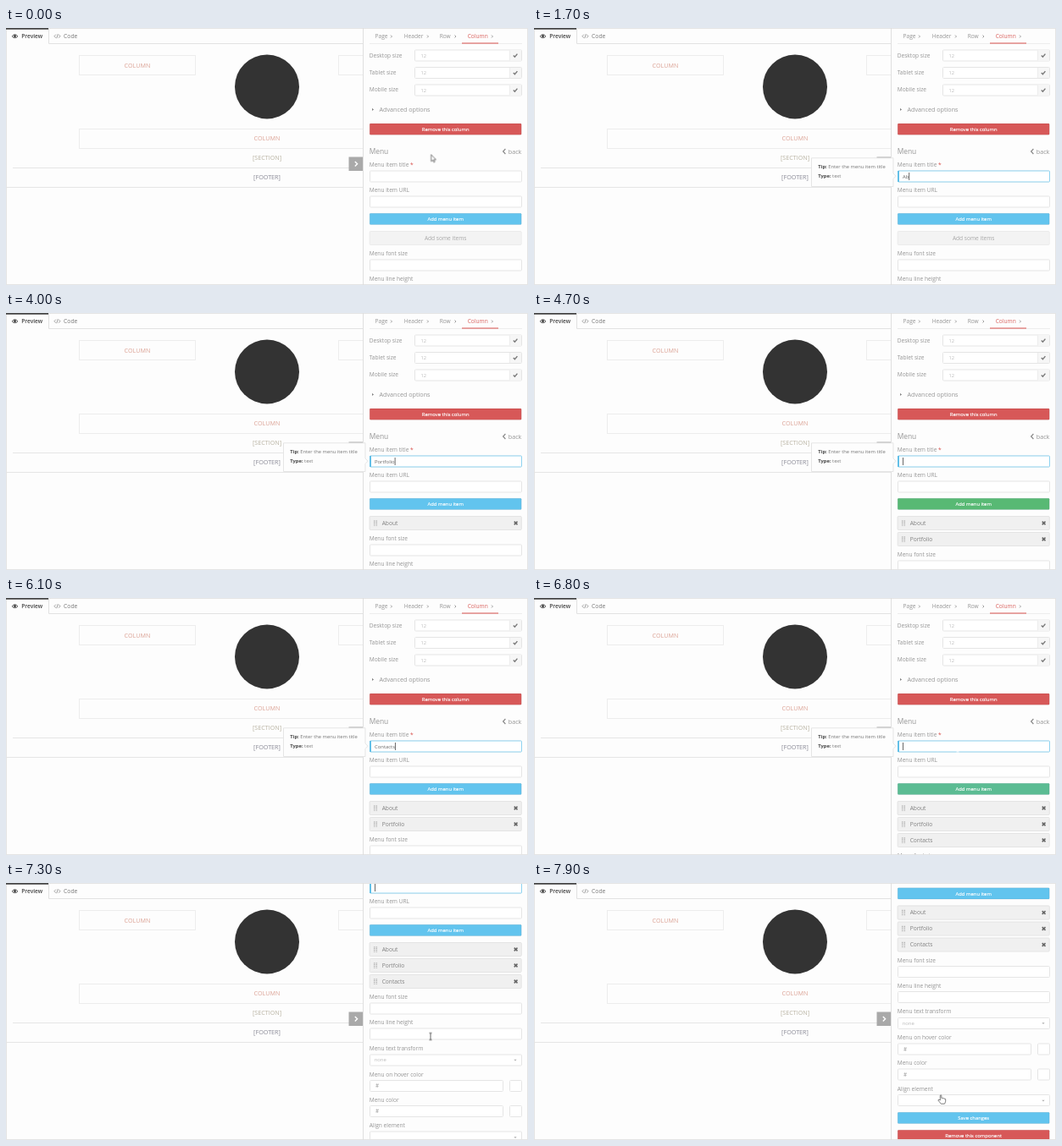
Recreate the animation shown at these times as an HTML page. Size 616x304 px, loop 8000 ms.

```html
<!DOCTYPE html>
<html lang="en">
<head>
<meta charset="utf-8">
<title>Menu editor</title>
<style>
  html, body { margin: 0; width: 100%; height: 100%; overflow: hidden; background: #fdfdfd; }
  svg { display: block; width: 616px; height: 304px; }
  text { font: 6.6px "Open Sans", "Noto Sans", sans-serif; fill: #959595; white-space: pre; }
  .mid { text-anchor: middle; }
  .big { font-size: 7.2px; }
  .btn { font-size: 5.9px; fill: #fff; stroke: #fff; stroke-width: .15; text-anchor: middle; }
  .val { font-size: 5.9px; fill: #666; }
  .hint { font-size: 5.7px; fill: #bbb; }
  .tip { font-size: 5.8px; fill: #777; }
  .tip tspan { font-weight: 700; fill: #444; }
  .item { font-size: 6.6px; fill: #808080; }
  .box { fill: #fff; stroke: #e5e5e5; }
  .line { fill: none; stroke: #ededed; }
  .ico { fill: none; stroke: #8a8a8a; }
  .blue { fill: #62c4ee; stroke: rgba(0, 60, 90, .16); stroke-width: .6; }
  .red { fill: #d75858; stroke: rgba(90, 0, 0, .16); stroke-width: .6; }

  .anim { animation: 8s step-end -20ms infinite; }
  #scroll { animation-name: scroll; }
  #tip { animation-name: tip; }
  #focus { animation-name: focus; }
  #arrow { animation-name: arrow; }
  #beam { animation-name: beam; }
  #hand { animation-name: hand; }
  #add { animation-name: add; }
  .flush { animation-name: flush; }

  @keyframes scroll {
    0% { transform: translateY(0); }
    86.25% { transform: translateY(-6px); }
    87.5% { transform: translateY(-22px); }
    88.75% { transform: translateY(-46.5px); }
    90% { transform: translateY(-104px); }
    91.25% { transform: translateY(-170px); }
    92.5%, 100% { transform: translateY(-213.5px); }
  }
  @keyframes tip {
    0% { opacity: 0; }
    10% { opacity: .35; }
    11.25% { opacity: .7; }
    12.5% { opacity: 1; }
    90% { opacity: .5; }
    91.25%, 100% { opacity: 0; }
  }
  @keyframes focus { 0% { opacity: 0; } 10%, 100% { opacity: 1; } }
  @keyframes arrow {
    0% { transform: translate(501.5px, 149.5px); opacity: 1; }
    6.25% { transform: translate(502px, 155px); opacity: 1; }
    7.5% { transform: translate(502px, 163px); opacity: 1; }
    8.75%, 100% { opacity: 0; }
  }
  @keyframes beam {
    0% { opacity: 0; }
    8.75% { transform: translate(502px, 175.5px); stroke: #555; opacity: 1; }
    13.75% { opacity: 0; }
    85% { transform: translate(500px, 178px); stroke: #fff; opacity: 1; }
    90% { transform: translate(501px, 181.5px); stroke: #555; opacity: 1; }
    95%, 100% { opacity: 0; }
  }
  @keyframes hand {
    0% { opacity: 0; }
    97.5% { transform: translate(478px, 240px); opacity: 1; }
    98.75%, 100% { transform: translate(476px, 250px); opacity: 1; }
  }
  /* flashes green on every added item, then fades back */
  @keyframes add {
    0% { fill: #62c4ee; }
    26.25% { fill: #62c4ee; animation-timing-function: steps(3); }
    30% { fill: #58b974; }
    31.25% { fill: #58b974; animation-timing-function: steps(4); }
    36.25% { fill: #62c4ee; }
    55% { fill: #62c4ee; animation-timing-function: steps(3); }
    58.75% { fill: #58b974; }
    60% { fill: #58b974; animation-timing-function: steps(5); }
    66.25% { fill: #62c4ee; }
    77.5% { fill: #62c4ee; animation-timing-function: steps(3); }
    81.25% { fill: #58b974; }
    83.75% { fill: #58b974; animation-timing-function: steps(4); }
    88.75%, 100% { fill: #62c4ee; }
  }
  @keyframes flush {
    0% { stroke: #666; }
    86.25% { stroke: #c24a4a; }
    90%, 100% { stroke: #666; }
  }
</style>
</head>
<body>
<svg viewBox="0 0 616 304">
  <defs>
    <clipPath id="view"><rect x="1" y="19" width="420" height="284"/></clipPath>
    <clipPath id="side"><rect x="421" y="1" width="194" height="302"/></clipPath>
    <path id="next" class="ico" d="M0-1.5 1.5 0 0 1.5" stroke-width=".8"/>
    <path id="drop" d="M-1.6-.8h3.2L0 1z" fill="#aaa"/>
    <g id="size">
      <rect class="box" x="482.5" y="-6.5" width="126" height="13" rx="1"/>
      <path d="M594.5-6h13.5v12h-13.5z" fill="#f6f6f6"/>
      <path class="line" d="M594.5-6v12"/>
      <path class="ico" d="M598.8 0l1.6 1.7 3-3.6" stroke-width="1.4" style="stroke:#777"/>
      <text class="hint" x="489.5" y="2">12</text>
    </g>
    <rect id="field" class="box" x="429.5" y=".5" width="179" height="13" rx="1"/>
    <rect id="button" x="429.2" y=".3" width="179" height="13.2" rx="1"/>
    <g id="color">
      <rect class="box" x="429.5" y=".5" width="157" height="13" rx="1"/>
      <rect class="box" x="594.5" y=".5" width="14" height="13" rx="1"/>
      <text class="hint" x="436" y="9.4" style="font-size:6.4px;fill:#999">#</text>
    </g>
    <g id="bar">
      <rect x="429.2" y=".5" width="179" height="16" rx="1" fill="#f0f0f0" stroke="#e4e4e4"/>
      <path d="M434.7 5.3v6.8M437.3 5.3v6.8" stroke="#b5b5b5" stroke-width="1.5" stroke-dasharray="1.1 .7"/>
      <path class="anim flush" d="M599.7 6.6l3.8 3.8m0-3.8l-3.8 3.8" stroke-width="1.5"/>
    </g>
  </defs>

  <rect width="616" height="304" fill="#fdfdfd"/>

  <!-- preview -->
  <g clip-path="url(#view)">
    <g class="line">
      <rect x="86.5" y="32.5" width="137" height="23"/>
      <rect x="392.5" y="32.5" width="137" height="23"/>
      <rect x="86.5" y="119.5" width="443" height="23"/>
      <path d="M8 165.5h413M1 188.5h420" stroke="#e6e6e6"/>
    </g>
    <circle cx="308" cy="69.5" r="38" fill="#333"/>
    <text class="big mid" x="155" y="46.6" style="fill:#dca396">COLUMN</text>
    <text class="big mid" x="308" y="133.4" style="fill:#dca396">COLUMN</text>
    <text class="big mid" x="308" y="156.3" style="fill:#b8b2a2">[SECTION]</text>
    <text class="big mid" x="308" y="179.3" style="fill:#8a8a96">[FOOTER]</text>
  </g>

  <!-- tabs -->
  <path d="M50.5 1v17.5H421" fill="none" stroke="#e2e2e2"/>
  <path d="M.5 0v304M0 303.5h616M615.5 0v304M50 .5h566" fill="none" stroke="#e4e4e4"/>
  <path d="M0 0h50v1.7H0z" fill="#444"/>
  <path d="M7 9.8Q10.5 5.6 14 9.8 10.5 13.6 7 9.8z" fill="none" stroke="#444" stroke-width=".9"/>
  <circle cx="10.5" cy="9.6" r="1.5" fill="#444"/>
  <text x="18.3" y="12" style="font-weight:600;fill:#444">Preview</text>
  <path class="ico" d="M58.8 7.7l-1.8 2 1.8 2m3.4-4l1.8 2-1.8 2M61.2 7.2l-1.4 5" stroke-width=".8"/>
  <text x="68" y="12" style="font-size:6.8px;fill:#777">Code</text>

  <rect x="404.5" y="152.5" width="17" height="16.5" fill="#a9a9a9"/>
  <path d="M411.8 158l2.8 2.8-2.8 2.8" fill="none" stroke="#fff" stroke-width="1.4"/>

  <!-- side panel -->
  <path d="M421.5 0v304" stroke="#dfdfdf"/>
  <g clip-path="url(#side)">
    <g id="scroll" class="anim">
      <path class="line" d="M429 18.5h180"/>
      <path d="M538 18h43" stroke="#d9534f"/>
      <text x="435.6" y="12.3">Page</text><use href="#next" x="454" y="10"/>
      <text x="469.7" y="12.3">Header</text><use href="#next" x="497" y="10"/>
      <text x="511.7" y="12.3">Row</text><use href="#next" x="529.5" y="10"/>
      <text x="544.7" y="12.3" style="fill:#d9605c">Column</text><use href="#next" x="573" y="10"/>

      <text x="428.7" y="34.7">Desktop size</text><use href="#size" y="32.5"/>
      <text x="428.7" y="55.1">Tablet size</text><use href="#size" y="53"/>
      <text x="428.7" y="75.4">Mobile size</text><use href="#size" y="73.5"/>

      <path class="anim flush" d="M432.5 95.4v2l1-1z" fill="#777" stroke-width=".6"/>
      <text class="big" x="440.5" y="99.1">Advanced options</text>
      <use href="#button" class="red" y="112.8"/>
      <text class="btn" x="518.7" y="121.8">Remove this column</text>

      <text x="428.7" y="149.2" style="font-size:8.4px">Menu</text>
      <path class="ico" d="M589.4 143l-2.8 3 2.8 3" stroke-width="1.2"/>
      <text class="big" x="592.8" y="148.7">back</text>

      <text x="428.7" y="164.3">Menu item title <tspan fill="#d9534f">*</tspan></text>
      <use href="#field" y="168.5"/>
      <g id="focus" class="anim">
        <rect x="429.5" y="169" width="179" height="13" rx="1" fill="#fff" stroke="#8fd3f0"/>
        <path d="M430 169v13" stroke="#62bfe7" stroke-width="2"/>
        <rect id="caret" x="435" y="171" width=".8" height="9" fill="#444"/>
      </g>
      <text id="typed" class="val" x="435" y="177.7"></text>

      <text x="428.7" y="194.3">Menu item URL</text>
      <use href="#field" y="198.5"/>
      <use href="#button" id="add" class="blue anim" y="219"/>
      <text class="btn" x="518.7" y="228.2">Add menu item</text>

      <rect x="429.2" y="240.5" width="179" height="16" rx="1" fill="#f3f3f3" stroke="#ebebeb"/>
      <text class="mid" x="518.7" y="250.8" style="fill:#a8a8a8">Add some items</text>
      <g class="entry"><use href="#bar" y="240"/><text class="item" x="443.7" y="250.5">About</text></g>
      <g class="entry"><use href="#bar" y="259"/><text class="item" x="443.7" y="269.5">Portfolio</text></g>
      <g class="entry"><use href="#bar" y="278"/><text class="item" x="443.7" y="288.5">Contacts</text></g>

      <g id="lower" transform="translate(0 175.5)">
        <text x="428.7" y="93.8">Menu font size</text><use href="#field" y="98"/>
        <text x="428.7" y="123.9">Menu line height</text><use href="#field" y="128"/>
        <text x="428.7" y="154.2">Menu text transform</text><use href="#field" y="159"/>
        <text class="hint" x="434.7" y="167.8" style="font-size:5.9px">none</text><use href="#drop" x="601" y="166"/>
        <text x="428.7" y="185.1">Menu on hover color</text><use href="#color" y="189.5"/>
        <text x="428.7" y="215.4">Menu color</text><use href="#color" y="219.5"/>
        <text x="428.7" y="245.6">Align element</text><use href="#field" y="250"/>
        <use href="#drop" x="601" y="257.5"/>
        <use href="#button" class="blue" y="271"/>
        <text class="btn" x="518.7" y="280.2">Save changes</text>
        <use href="#button" class="red" y="292"/>
        <text class="btn" x="518.7" y="301.1">Remove this component</text>
      </g>
    </g>
  </g>

  <g id="tip" class="anim">
    <path d="M327.5 153.8H424v18.2l3 3.2-3 3.2v9.1H327.5z" fill="#fdfdfd" stroke="#e2e2e2" stroke-width=".9"/>
    <text class="tip" x="335.3" y="165.8"><tspan>Tip:</tspan> Enter the menu item title</text>
    <text class="tip" x="335.3" y="177.4"><tspan>Type:</tspan> text</text>
  </g>

  <path id="arrow" class="anim" d="M.2.3v8l1.9-1.600 1.300 2.700 1.200-.6-1.200-2.600h2.500z" fill="#fff" stroke="#444" stroke-width=".7"/>
  <path id="beam" class="anim" d="M-1.6-4H1.6M0-4V4M-1.6 4H1.6" fill="none" stroke-width=".9"/>
  <path id="hand" class="anim" d="M3.3 7V1.3q.8-1.1 1.6 0V4.4q1.2-.5 1.6.4 1.2-.5 1.6.4 1.5-.3 1.6.8V8.2q-.3 1.5-1.2 3H4.3Q2.8 9.3 1 7.2.9 5.9 2.2 6.3z" fill="#fff" stroke="#444" stroke-width=".7"/>
</svg>
<script>
  // times of each keystroke, then of Enter, in ms
  const words = [
    { text: "About", keys: [1400, 1700, 1800, 2000, 2100], enter: 2300 },
    { text: "Portfolio", keys: [2600, 2800, 2900, 3100, 3300, 3400, 3700, 3800, 4000], enter: 4500 },
    { text: "Contacts", keys: [5000, 5200, 5500, 5500, 5800, 5900, 6000, 6100], enter: 6300 }
  ];
  const $ = id => document.getElementById(id);
  const typed = $("typed"), caret = $("caret"), lower = $("lower");
  const entries = document.querySelectorAll(".entry");
  const start = performance.now() - 20;

  function draw() {
    const t = (performance.now() - start) % 8000;
    const count = words.filter(w => t >= w.enter).length;
    const word = words[count];
    typed.textContent = word ? word.text.slice(0, word.keys.filter(k => t >= k).length) : "";
    caret.setAttribute("x", 435 + typed.getComputedTextLength());
    entries.forEach((e, i) => e.style.display = i < count ? "" : "none");
    lower.setAttribute("transform", `translate(0 ${175.5 + 19 * Math.max(0, count - 1)})`);
    requestAnimationFrame(draw);
  }
  draw();
</script>
</body>
</html>
```
